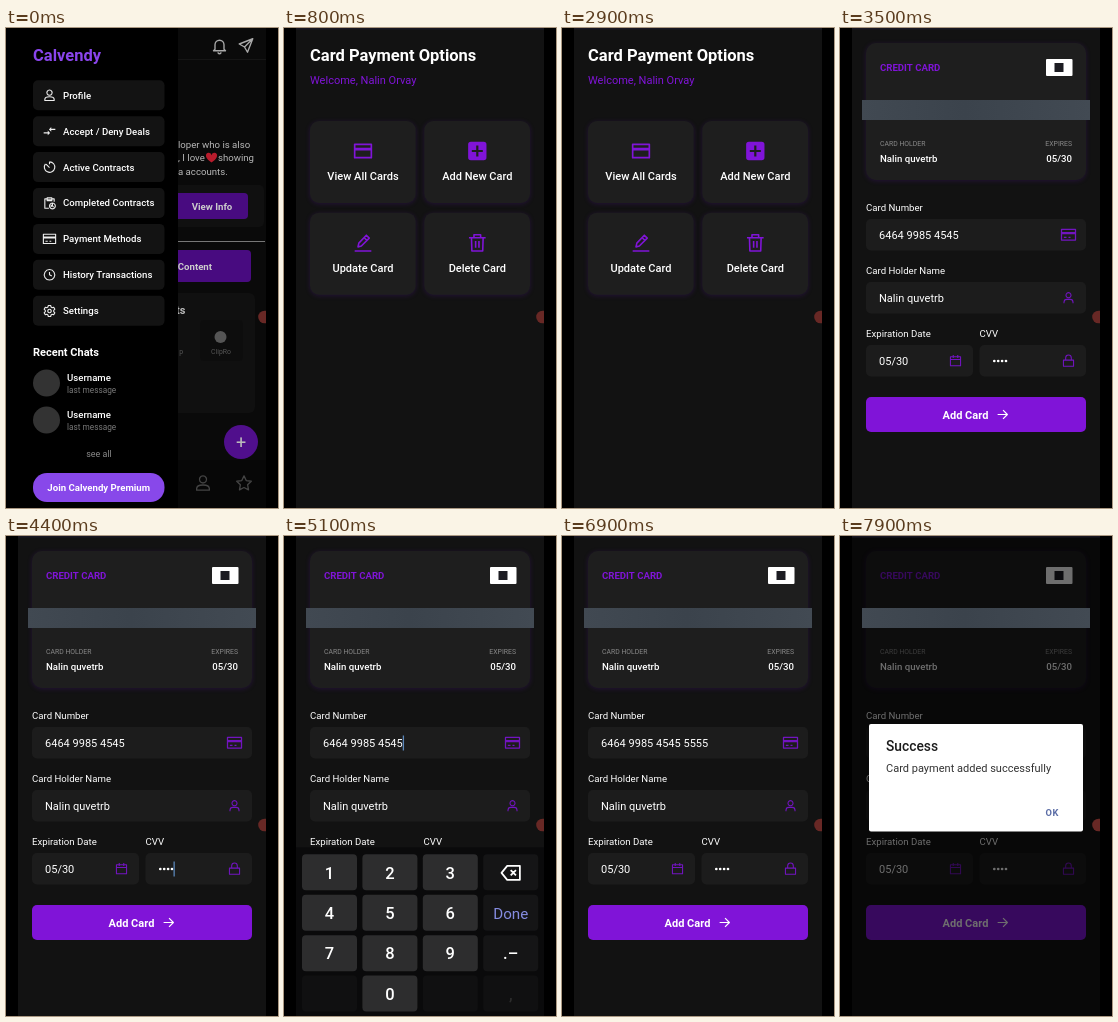
These frames come from a looping animation (272 by 480 pixels, 8000 ms). An HTML page with a canvas:

```html
<!DOCTYPE html>
<html lang="en">
<head>
<meta charset="utf-8">
<title>Card payment flow</title>
<style>
html, body { margin: 0; width: 100%; height: 100%; overflow: hidden; background: #000; }
canvas { display: block; width: 100vw; height: 100vh; }
</style>
</head>
<body>
<canvas id="stage"></canvas>
<script>
const W = 272, H = 480, LOOP = 8000, STEP = 100;
const PURPLE = '#8014d8', DIM_PURPLE = '#480b80', BG = '#121212', WHITE = '#fff';
const APP = 'Calvendy', OWNER = 'Nalin Orvay', HOLDER = 'Nalin quvetrb';

const res = Math.max(1, window.devicePixelRatio || 1);
const makeCtx = canvas => {
  canvas.width = W * res;
  canvas.height = H * res;
  const c = canvas.getContext('2d');
  c.scale(res, res);
  return c;
};
const main = makeCtx(document.getElementById('stage'));
const buffer = makeCtx(document.createElement('canvas'));
let g = main;

// Icons live on a 24 x 24 grid.
const ICON = {
  person: 'M12 3a4.500 4.500 0 1 0 .01 0M4 21v-2c0-3 4-4.500 8-4.500s8 1.500 8 4.500v2z',
  user: 'M12 3a4.500 4.500 0 1 0 .01 0M4 22v-2c0-3 2-5 5-5h6c3 0 5 2 5 5v2',
  swap: 'M9 14H2v2h7v3l4-4-4-4zM15 13v-3h7V8h-7V5l-4 4z',
  timer: 'M12 3a9 9 0 1 1-7 3.500M12 13L6 7M12 3v4',
  clipboard: 'M11 21H4V5h4M16 5h4v5M8 3h8v5H8zM8 5.500h8M17 12a5 5 0 1 0 .01 0M17 13v4l2 2M15 15v4',
  card: 'M2 4h20v16H2zM2 10.500h20M2 9h20',
  payCard: 'M1.500 4h21v16h-21zM1.500 9h21M1.500 10.500h21M5 16h4M12 16h3',
  clock: 'M12 3a9 9 0 1 0 .01 0M12 7v5l4 2',
  gear: 'M10 3h4l.6 2.600 2 1.200 2.600-.8 2 3.400-2 1.900v2.400l2 1.900-2 3.400-2.600-.8-2 1.200L14 22h-4l-.6-2.600-2-1.200-2.600.8-2-3.400 2-1.900v-2.400l-2-1.900 2-3.400 2.600.8 2-1.200zM12 9.500a3 3 0 1 0 .01 0',
  bell: 'M6 17v-6a6 6 0 0 1 12 0v6l2 2H4zM10 21a2 2 0 0 0 4 0',
  plane: 'M21 3L3 10l7 4 4 7zM21 3L10 14',
  star: 'M12 3l2.800 5.900 6.400.9-4.600 4.500 1.100 6.400-5.700-3-5.700 3 1.100-6.400L2.800 9.800l6.400-.9z',
  plusBox: 'M5 2h14a3 3 0 0 1 3 3v14a3 3 0 0 1-3 3H5a3 3 0 0 1-3-3V5a3 3 0 0 1 3-3zM10.800 6v4.800H6v2.400h4.800V18h2.400v-4.800H18v-2.400h-4.800V6z',
  pencil: 'M2 22h20M6 17l1-4.500L16 3l3.500 3.500L10 16zM13.500 6l3 3',
  trash: 'M2 6h20M8 6V2.500h8V6M5 6l.5 16h13L19 6M10 10v8M14 10v8',
  calendar: 'M3 5h18v16H3zM3 10h18M8 2v5M16 2v5',
  lock: 'M3 11h18v11H3zM7 11V7a5 5 0 0 1 10 0v4',
  arrow: 'M3 12h18M13 4l8 8-8 8',
  erase: 'M8 4h14.500v16H8l-6.500-8zM12 9l6 6M18 9l-6 6',
  heart: 'M12 21C2 14 1 10 1 7.500a5.500 5.500 0 0 1 11-1a5.500 5.500 0 0 1 11 1C23 10 22 14 12 21z'
};
const paths = {};
for (const name in ICON) paths[name] = new Path2D(ICON[name]);

const clamp = v => Math.min(1, Math.max(0, v));
const ramp = (t, a, b) => clamp((t - a) / (b - a));
const easeOut = v => 1 - (1 - v) ** 3;
const within = (t, a, b) => t >= a && t < b;

// Cubic Bezier (.208, .82, .25, 1), solved by bisection.
function screenEase(x) {
  const curve = (s, a, b) => 3 * (1 - s) ** 2 * s * a + 3 * (1 - s) * s * s * b + s ** 3;
  let lo = 0, hi = 1;
  for (let i = 0; i < 24; i++) {
    const mid = (lo + hi) / 2;
    if (curve(mid, .208, .25) < x) lo = mid; else hi = mid;
  }
  return curve(lo, .82, 1);
}

function rect(x, y, w, h, color, r = 0) {
  g.fillStyle = color;
  g.beginPath();
  g.roundRect(x, y, w, h, r);
  g.fill();
}

function disc(x, y, r, color) {
  g.fillStyle = color;
  g.beginPath();
  g.arc(x, y, r, 0, Math.PI * 2);
  g.fill();
}

// y is the middle of the capitals.
function text(str, x, y, size, color = WHITE, weight = 400, align = 'left') {
  g.font = `${weight} ${size}px Roboto, sans-serif`;
  g.textAlign = align;
  g.fillStyle = color;
  g.fillText(str, x, y + size * .355);
}

function icon(name, x, y, size, color, line = 2) {
  g.save();
  g.translate(x - size / 2, y - size / 2);
  g.scale(size / 24, size / 24);
  if (line) {
    g.strokeStyle = color;
    g.lineWidth = line;
    g.lineJoin = 'round';
    g.stroke(paths[name]);
  } else {
    g.fillStyle = color;
    g.fill(paths[name], 'evenodd');
  }
  g.restore();
}

function glowPanel(x, y, w, h, r) {
  g.save();
  g.shadowColor = 'rgba(90, 20, 170, .24)';
  g.shadowBlur = 5 * res;
  g.shadowOffsetY = res;
  rect(x, y, w, h, '#1e1e1e', r);
  g.restore();
}

function profileBehind() {
  rect(12, 0, 248, H, '#0a0a0a');
  rect(172, 31, 88, 1, '#151515');
  icon('bell', 213.5, 17.5, 18, '#aaa', 1.8);
  icon('plane', 240, 17.5, 18, '#aaa', 1.8);
  text('loper who is also', 172, 117, 9.64, '#b8b8b8');
  text(', I love', 172, 130, 9.64, '#b8b8b8');
  icon('heart', 205.5, 130, 12, '#b81c2c', 0);
  text('showing', 248, 130, 9.64, '#b8b8b8', 400, 'right');
  text('a accounts.', 172, 143.5, 9.64, '#b8b8b8');
  rect(150, 157, 108, 42, '#101010', 5);
  rect(150, 165, 92, 26, DIM_PURPLE, 4);
  text('View Info', 206, 178.5, 9.64, '#ccc', 700, 'center');
  rect(172, 213, 87, 1, '#777');
  rect(150, 222, 95, 32, DIM_PURPLE, 4);
  text('Content', 206, 238.5, 9.64, '#ccc', 700, 'right');
  rect(150, 265, 99, 120, '#101010', 6);
  text('ts', 179.5, 282, 11, '#bbb', 700, 'right');
  rect(194, 292, 43, 41, '#0d0d0d', 4);
  disc(214.5, 309, 6, '#555');
  text('ClipRo', 215, 324, 6.9, '#555', 400, 'center');
  text('p', 177, 324, 6.9, '#555', 400, 'right');
  rect(172, 432, 88, 48, '#070707');
  disc(235, 414, 17, '#500f8c');
  text('+', 235, 414, 18, '#bbb', 400, 'center');
  icon('person', 197, 455, 19, '#444', 1.7);
  icon('star', 238, 455, 19, '#444', 1.7);
}

const MENU = [
  ['person', 'Profile'], ['swap', 'Accept / Deny Deals'], ['timer', 'Active Contracts'],
  ['clipboard', 'Completed Contracts'], ['payCard', 'Payment Methods'],
  ['clock', 'History Transactions'], ['gear', 'Settings']
];

function drawerPage() {
  profileBehind();
  rect(12, 0, 160, H, '#000');
  text(APP, 27, 27.5, 16.5, '#8a45ec', 700);
  MENU.forEach(([name, label], i) => {
    const y = 67.3 + i * 35.9;
    rect(27, y - 15, 131.5, 30, '#131313', 5);
    icon(name, 43.5, y, 14, '#eee', name === 'swap' ? 0 : 1.9);
    text(label, 57, y, 9.64, WHITE, 500);
  });
  text('Recent Chats', 27, 324.3, 11.02, WHITE, 700);
  for (const y of [355, 392]) {
    disc(40.5, y, 13.5, '#333');
    text('Username', 61, y - 5, 9.64, WHITE, 500);
    text('last message', 61, y + 7.2, 8.27, '#777');
  }
  text('see all', 93, 426, 8.96, '#888', 400, 'center');
  rect(27, 445, 131.5, 29, '#8848ea', 14);
  text(`Join ${APP} Premium`, 92.7, 460, 9.64, WHITE, 700, 'center');
}

const OPTIONS = [
  ['card', 'View All Cards', 20, 2], ['plusBox', 'Add New Card', 22, 0],
  ['pencil', 'Update Card', 20, 1.9], ['trash', 'Delete Card', 20, 1.9]
];

function optionsPage() {
  rect(0, 0, W, H, BG);
  text('Card Payment Options', 26, 27, 16.5, WHITE, 700);
  text(`Welcome, ${OWNER}`, 26, 52, 11.02, PURPLE);
  OPTIONS.forEach(([name, label, size, line], i) => {
    const x = i % 2 ? 140.3 : 26, y = i < 2 ? 93 : 184.7;
    glowPanel(x, y, 105.7, 82, 9);
    icon(name, x + 53, y + 30, size, PURPLE, line);
    text(label, x + 53, y + 55, 11.02, WHITE, 500, 'center');
  });
}

function blankPage() {
  rect(0, 0, W, H, BG);
}

function field(label, value, x, y, w, name) {
  text(label, x, y - 27, 9.64);
  rect(x, y - 16, w, 31.5, '#1c1c1c', 5);
  text(value, x + 13, y, 11.02);
  icon(name, x + w - 17.5, y - .3, name === 'payCard' ? 16 : 13.5, '#7214c0', 1.9);
}

function cursor(x, y) {
  rect(x, y - 7.5, 1.3, 15, '#5a86b8');
}

function formPage(t) {
  rect(0, 0, W, H, BG);
  glowPanel(26, 15, 220, 137, 10);
  text('CREDIT CARD', 40, 40, 9.64, PURPLE, 700);
  rect(206, 31, 26.5, 17, WHITE, 1);
  rect(214.5, 35, 9, 9, '#1c1c22');
  text('CARD HOLDER', 40, 116, 6.89, '#888');
  text(HOLDER, 40, 131, 9.64, WHITE, 500);
  text('EXPIRES', 232, 116, 6.89, '#888', 400, 'right');
  text('05/30', 232, 131, 9.64, WHITE, 500, 'right');

  const typed = Math.round(4 * ramp(t, 5600, 6000));
  const number = '6464 9985 4545' + (typed ? ' ' + '5'.repeat(typed) : '');
  field('Card Number', number, 26, 207, 220, 'payCard');
  if (within(t, 4800, 5400) || within(t, 5700, 6400)) {
    g.font = '400 11.02px Roboto, sans-serif';
    cursor(39 + g.measureText(number).width, 207);
  }
  field('Card Holder Name', HOLDER, 26, 270, 220, 'user');
  field('Expiration Date', '05/30', 26, 333, 107, 'calendar');
  field('CVV', '', 139.5, 333, 106.5, 'lock');
  for (let i = 0; i < 4; i++) disc(154.3 + i * 3.9, 333, 1.35, WHITE);
  if (within(t, 4400, 4800)) cursor(167.5, 333);

  rect(26, 369, 220, 35, PURPLE, 5);
  text('Add Card', 102.5, 387, 11.02, WHITE, 700);
  icon('arrow', 162.5, 386.5, 13, WHITE, 2.2);
}

function keyboard(t) {
  const shown = easeOut(ramp(t, 4750, 5150)) * (1 - easeOut(ramp(t, 6380, 6850)));
  if (!shown) return;
  g.save();
  g.translate(0, (1 - shown) * 170);
  rect(12, 311, 248, 170, '#0a0a0b');
  const keys = ['1', '2', '3', 'erase', '4', '5', '6', 'Done', '7', '8', '9', '.–', '', '0', '', ','];
  keys.forEach((key, i) => {
    const col = i % 4, row = i >> 2;
    const x = 18 + col * 60.4, y = 318 + row * 40.4;
    const digit = /^\d$/.test(key);
    const pressed = key === '5' && within(t, 5700, 6100);
    rect(x, y, 55, 36, pressed ? '#4a4a4d' : digit ? '#2d2d2e' : row === 3 ? '#101011' : '#151516', 4);
    const cx = x + 27.5, cy = y + 18.5;
    if (key === 'erase') icon(key, cx, cy, 21, WHITE, 2);
    else if (key === 'Done') text(key, cx, cy, 15.2, '#858ce0', 400, 'center');
    else text(key, cx, cy, 16.5, key === ',' ? '#2c2c2c' : WHITE, 500, 'center');
  });
  g.restore();
}

function dialog(shown, title, message) {
  if (!shown) return;
  rect(12, 0, 248, H, `rgba(0, 0, 0, ${.57 * shown})`);
  g.save();
  g.globalAlpha = shown;
  rect(29, 188, 214, 107.5, WHITE, 2);
  text(title, 46, 210.5, 13.78, '#1c1c1c', 500);
  text(message, 46, 232.3, 11.02, '#333');
  g.letterSpacing = '.6px';
  text('OK', 205.5, 277, 9.3, '#5b6da6', 700);
  g.restore();
}

function layer(draw, alpha, scale) {
  if (alpha <= 0) return;
  g = buffer;
  g.clearRect(0, 0, W, H);
  draw();
  g = main;
  g.save();
  g.globalAlpha = alpha;
  g.translate(136, 241);
  g.scale(scale, scale);
  g.drawImage(buffer.canvas, -136, -241, W, H);
  g.restore();
}

const underAlpha = p => 1 - clamp((p - .2075) / .7925);

function push(from, to, p) {
  rect(12, 0, 248, H, WHITE);
  layer(from, underAlpha(p), 1 + .075 * p);
  layer(to, ramp(p, .75, .875), .85 + .15 * p);
}

function pop(from, to, p) {
  rect(12, 0, 248, H, WHITE);
  layer(to, underAlpha(1 - p), 1 + .075 * (1 - p));
  layer(from, 1 - p, 1 - .075 * p);
}

function formScene(t) {
  formPage(t);
  if (within(t, 7200, 7400)) rect(26, 369, 220, 35, 'rgba(255, 255, 255, .1)', 5);
  keyboard(t);
  dialog(easeOut(ramp(t, 3500, 3850)) * (1 - ramp(t, 4100, 4400)), 'Error', 'Invalid card number');
  dialog(easeOut(ramp(t, 7300, 7850)), 'Success', 'Card payment added successfully');
  band();
}

// Blurred strip that hides the number on the card.
function band() {
  const fill = g.createLinearGradient(22, 0, 250, 0);
  fill.addColorStop(0, '#414952');
  fill.addColorStop(.45, '#3b434c');
  fill.addColorStop(1, '#424a53');
  rect(22, 72, 228, 20, fill);
}

function scene(t) {
  const progress = start => screenEase(ramp(t, start, start + 400));
  if (t < 800) drawerPage();
  else if (t < 2000) optionsPage();
  else if (t < 2600) push(optionsPage, blankPage, progress(1953));
  else if (t < 2900) pop(blankPage, optionsPage, progress(2553));
  else if (t < 3000) optionsPage();
  else if (t < 3400) push(optionsPage, () => formPage(t), progress(2953));
  else formScene(t);
}

function draw(t) {
  g = main;
  rect(0, 0, W, H, '#000');
  g.save();
  g.beginPath();
  g.rect(12, 0, 248, H);
  g.clip();
  scene(t);
  if (t >= 800) rect(12, 0, 248, 1.5, '#171622');
  disc(258.5, 289, 6.3, '#682825');
  g.restore();
}

function tick() {
  const t = performance.now() % LOOP;
  draw(Math.floor(t / STEP) * STEP);
  requestAnimationFrame(tick);
}
tick();
</script>
</body>
</html>
```
